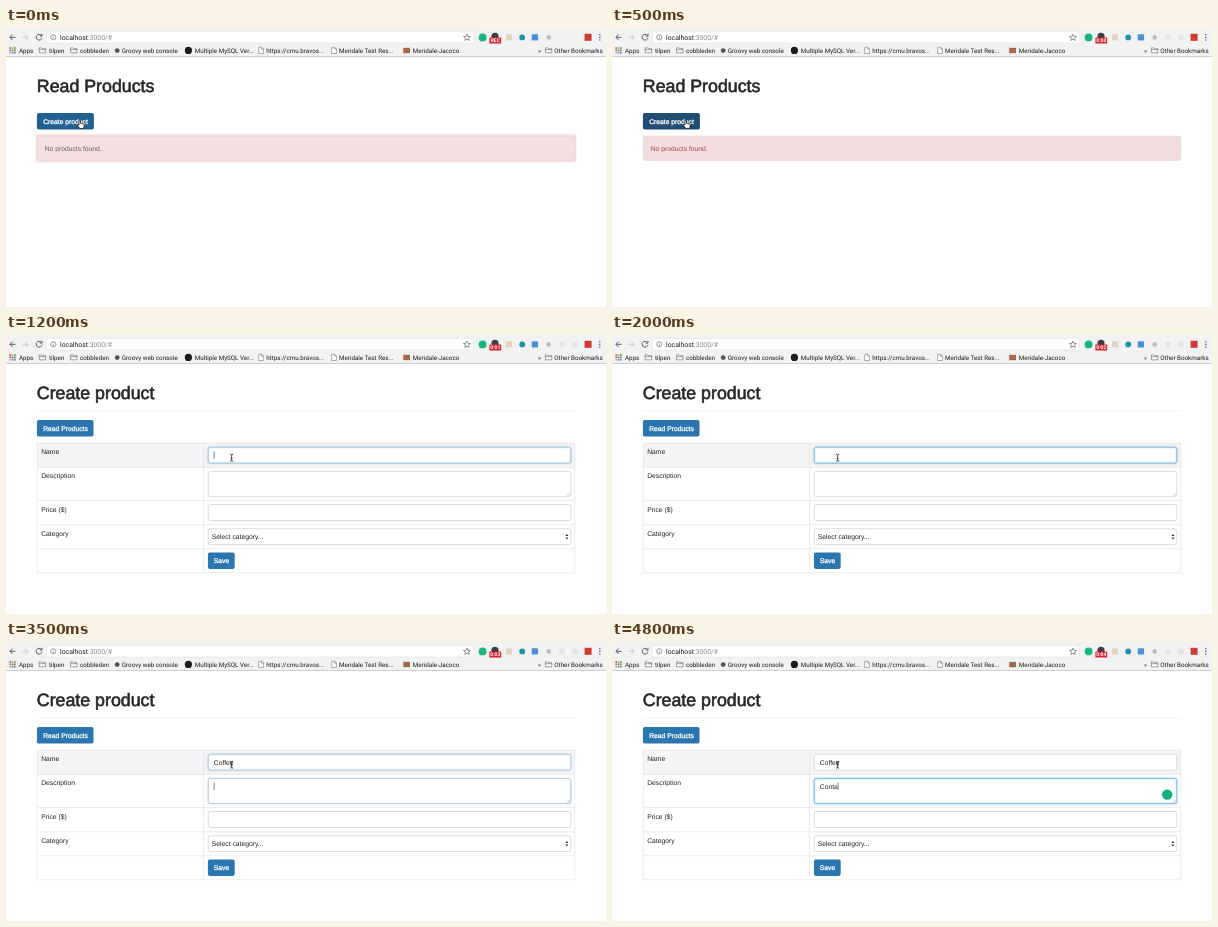
An HTML page that plays this animation: 600 by 279 pixels, repeating every 5 s.

```html
<!DOCTYPE html>
<html lang="en">
<head>
<meta charset="utf-8">
<title>Create product</title>
<style>
  html, body { margin: 0; width: 100%; height: 100%; overflow: hidden; background: #fff; }
  svg { display: block; width: 600px; height: 279px; }
  text { font: 6.75px "Liberation Sans", Arial, sans-serif; fill: #222; text-rendering: geometricPrecision; white-space: pre; }
  .bar text { font: 6.25px Roboto, sans-serif; fill: #1c1c1c; }
  .bar .url { font-size: 6.85px; }
  .title { font-size: 17.8px; fill: #262626; stroke: #262626; stroke-width: .6px; }
  .label { fill: #fff; stroke: #fff; stroke-width: .3px; }
  .button { fill: #2a76b1; }
  .line { fill: none; stroke: #e0e0e0; stroke-width: .6px; }
  .field { fill: #fff; stroke: #cdcdcd; stroke-width: .7px; }
  .halo { fill: none; stroke: #74bce6; }
</style>
</head>
<body>
<svg viewBox="0 0 600 279">
  <defs>
    <filter id="soft" x="-5%" y="-50%" width="110%" height="200%"><feGaussianBlur stdDeviation="1.2"/></filter>
    <path id="folder" d="M-3.2-2.5h2.3l.8.9h3.3v4.1h-6.4zM-3.2-.6h6.4" fill="#fafafa" stroke="#666" stroke-width=".6"/>
    <path id="sheet" d="M-2.3-3.1h3l1.7 1.7v4.5h-4.7zM.6-3.1v1.8h1.8" fill="#fff" stroke="#777" stroke-width=".6"/>
  </defs>
  <rect width="600" height="279" fill="#fff"/>

  <g class="bar">
    <rect width="600" height="28.5" fill="#f2f2f2"/>
    <rect x="40.5" y="3.5" width="427" height="11.5" rx="1.5" fill="#fff" stroke="#dedede" stroke-width=".5"/>
    <path d="M0 28.5H600" stroke="#c6c6c6" stroke-width=".8"/>
    <g fill="none" stroke-width=".95">
      <path d="M9.5 9.3H4M6.6 6.6L3.9 9.3l2.7 2.7" stroke="#555"/>
      <path d="M16.5 9.3H22M19.4 6.6l2.7 2.7-2.7 2.7" stroke="#c9c9c9"/>
      <path d="M35.2 7.3A2.9 2.9 0 1 0 35.9 9.8M36 5.8v2.3h-2.3" stroke="#555"/>
      <circle cx="47.3" cy="9.3" r="2.6" stroke="#777" stroke-width=".7"/>
      <path d="M47.3 8.9v2M47.3 7.5v.7" stroke="#777" stroke-width=".7"/>
      <path d="M461 6l1 2.3 2.5.2-1.9 1.6.6 2.4-2.2-1.3-2.2 1.3.6-2.4-1.9-1.6 2.5-.2z" stroke="#666" stroke-width=".7"/>
    </g>
    <text class="url" x="54" y="11.8">localhost<tspan fill="#888">:3000/#</tspan></text>
    <circle cx="476.6" cy="9.4" r="3.9" fill="#17b57f"/>
    <circle cx="489" cy="8.4" r="3.6" fill="#3d3d46"/>
    <rect x="483.4" y="9.6" width="11.8" height="5.9" rx=".6" fill="#d8232a"/>
    <text id="badge" x="489.3" y="14.4" text-anchor="middle" style="font-size:5px;font-weight:700;fill:#fff"></text>
    <rect x="500" y="6.4" width="6" height="6" fill="#e3d2bd"/>
    <circle cx="516.2" cy="9.4" r="2.9" fill="#1b93a8"/>
    <rect x="525.7" y="6.2" width="6.4" height="6.4" rx=".8" fill="#4b8fd8"/>
    <circle cx="542.7" cy="9.4" r="2.3" fill="#bdbdbd"/>
    <g id="faint" fill="#e4e4e4"><circle cx="556" cy="9.4" r="3"/><circle cx="569" cy="9.4" r="3"/></g>
    <rect x="578.6" y="5.8" width="7" height="7" fill="#cf3a34"/>
    <g fill="#666"><circle cx="593.8" cy="6.8" r=".8"/><circle cx="593.8" cy="9.4" r=".8"/><circle cx="593.8" cy="12" r=".8"/></g>

    <g id="apps"></g>
    <use href="#folder" x="36.4" y="22.3"/><use href="#folder" x="67.8" y="22.3"/><use href="#folder" x="542.6" y="22.3"/>
    <circle cx="111.2" cy="22.6" r="2.4" fill="#555"/>
    <circle cx="182.4" cy="22.4" r="3.6" fill="#1c1c1c"/>
    <use href="#sheet" x="255" y="22.4"/><use href="#sheet" x="328" y="22.4"/>
    <rect x="397.2" y="19.8" width="6.8" height="5.4" fill="#a5694b"/>
    <g id="marks"></g>
  </g>

  <g id="list">
    <text class="title" x="30.8" y="63.8">Read Products</text>
    <rect id="create" x="30.9" y="85.1" width="57" height="16.4" rx="1.8"/>
    <text class="label" x="37.2" y="95.8">Create product</text>
    <rect id="glow" x="31.5" y="108" width="537" height="24.5" fill="none" stroke="#f2d4d6" stroke-width="3" filter="url(#soft)"/>
    <rect id="alert" x="31.3" y="108.2" width="537.4" height="24.2" rx="2" stroke="#ebccd1" stroke-width=".6"/>
    <text id="empty" x="38.7" y="122.7">No products found.</text>
  </g>

  <g id="form">
    <text class="title" x="30.8" y="63.8">Create product</text>
    <path d="M31 76H569" stroke="#eee" stroke-width=".7"/>
    <rect class="button" x="30.9" y="85.1" width="56.6" height="16.4" rx="1.8"/>
    <text class="label" x="37.2" y="95.8">Read Products</text>
    <rect id="row" x="31.3" y="108.2" width="537.4" height="24.2" fill="#f5f4f6"/>
    <path class="line" d="M31.3 108.2H568.7V237.8H31.3ZM31.3 132.4H568.7M31.3 165.5H568.7M31.3 189.8H568.7M31.3 213.8H568.7M197.6 108.2V237.8"/>
    <g id="labels"></g>
    <g id="fields"></g>
    <path d="M561 160.6l2.8-2.8M562.6 160.6l1.2-1.2" stroke="#999" stroke-width=".5"/>
    <text x="205.8" y="204.2">Select category...</text>
    <path d="M559.4 201.1l1.5-2 1.5 2zM559.4 202.4l1.5 2 1.5-2z" fill="#333"/>
    <rect class="button" x="201.9" y="217.6" width="26.8" height="16.3" rx="1.8"/>
    <text class="label" x="207.8" y="228.2">Save</text>
    <text id="name" x="207.8" y="122.7"></text>
    <text id="desc" x="207.8" y="146.6"></text>
    <path id="caret" d="M0 0V7.6" stroke="#333" stroke-width=".6"/>
    <circle id="helper" cx="555.2" cy="152.6" r="5.2" fill="#12b184"/>
  </g>

  <g id="hand"><path d="M-1.2-3.6q.9-.9 1.5 0V-.9l3 .7q.8.3.7 1.2L3.4 4.3H-.2L-2.9 1q-.2-1.1.8-.8l.9.8z" fill="#fff" stroke="#111" stroke-width=".7"/></g>
  <g id="arrow"><path d="M0 0v7.6l1.8-1.6 1.2 2.8 1.2-.5-1.2-2.7h2.4z" fill="#111" stroke="#fff" stroke-width=".5"/></g>
  <g id="beam"><path d="M-1.6-3.4Q0-3.4 0-2.4Q0-3.4 1.6-3.4M0-2.4V2.6M-1.6 3.6Q0 3.6 0 2.6Q0 3.6 1.6 3.6M-.9.9H.9" fill="none" stroke="#222" stroke-width=".75"/></g>
</svg>
<script>
const LOOP = 5000, STEP = 100;
const FORM_AT = 600, FOCUS_NAME = 1100, FOCUS_DESC = 3430, FADE = 150;
const $ = id => document.getElementById(id);

function add(parent, tag, attrs, text = '') {
  const el = document.createElementNS('http://www.w3.org/2000/svg', tag);
  for (const key in attrs) el.setAttribute(key, attrs[key]);
  el.textContent = text;
  return parent.appendChild(el);
}

// Static parts
const tints = ['#d9534f', '#e5a93d', '#4aa564', '#4a8fd6', '#d9534f', '#4aa564', '#e5a93d', '#4a8fd6', '#8a6bb8'];
tints.forEach((fill, i) => add($('apps'), 'rect', {
  x: 3.4 + i % 3 * 2.3, y: 19.2 + Math.floor(i / 3) * 2.3, width: 1.7, height: 1.7, fill
}));

[[13, 'Apps'], [43, 'tilpen'], [74, 'cobbleden'], [115.8, 'Groovy web console'],
 [188.8, 'Multiple MySQL Ver...'], [260.2, 'https://cmu.bravos...'], [333, 'Meridale Test Res...'],
 [406.8, 'Meridale-Jacoco'], [532, '»'], [548.3, 'Other Bookmarks']]
  .forEach(([x, label]) => add($('marks'), 'text', { x, y: 24.7 }, label));

[['Name', 119.3], ['Description', 143.3], ['Price ($)', 176.5], ['Category', 200.5]]
  .forEach(([label, y]) => add($('labels'), 'text', { x: 35.2, y }, label));

const halos = [[112.2, 16], [136.4, 25.2], [169.5, 16], [193.8, 15.8]].map(([y, height]) => {
  const box = { x: 202.2, y, width: 362.6, height, rx: 2 };
  add($('fields'), 'rect', { ...box, class: 'field' });
  const halo = add($('fields'), 'g', { class: 'halo' });
  add(halo, 'rect', { ...box, 'stroke-width': 1.6, 'stroke-opacity': .4, filter: 'url(#soft)' });
  add(halo, 'rect', { ...box, 'stroke-width': .8 });
  return halo;
});

// Time of each visible key press and the text it leaves
const nameKeys = [[2700, 'C'], [2800, 'Co'], [3000, 'Coff'], [3100, 'Coffe'], [3200, 'Coffee']];
const descKeys = [[4000, 'C'], [4200, 'Co'], [4400, 'Con'], [4600, 'Cont'], [4800, 'Conta']];
const badges = [[0, 'REC'], [100, '0:00'], [1100, '0:01'], [2000, '0:02'], [3100, '0:03'], [4100, '0:04']];

const latest = (steps, t, start) => steps.reduce((last, s) => s[0] <= t ? s : last, start);
const ramp = (t, from, length) => Math.min(1, Math.max(0, (t - from) / length));
const show = (el, on) => el.setAttribute('visibility', on ? 'visible' : 'hidden');
const place = (el, x, y) => el.setAttribute('transform', `translate(${x} ${y})`);

function drawPointer(t) {
  const p = ramp(t, 600, 400), ease = p * p * (3 - 2 * p);
  const x = 74.2 + 151.4 * ease, y = 96.2 + 26.4 * ease;
  const kind = x < 87 ? 'hand' : x > 202 ? 'beam' : 'arrow';
  for (const id of ['hand', 'arrow', 'beam']) {
    show($(id), id === kind);
    place($(id), x, y);
  }
  $('row').setAttribute('opacity', y > 108 ? 1 : 0);
}

function drawList(t) {
  const first = t < 100;
  show($('glow'), first);
  $('create').setAttribute('fill', first ? '#22608f' : '#204d74');
  $('alert').setAttribute('fill', first ? '#f4e0e0' : '#f2dede');
  $('empty').style.fill = first ? '#75595b' : '#a94442';
}

function drawForm(t) {
  const inDesc = t >= FOCUS_DESC;
  const name = latest(nameKeys, t, [FOCUS_NAME, '']);
  const desc = latest(descKeys, t, [FOCUS_DESC, '']);
  $('name').textContent = name[1];
  $('desc').textContent = desc[1];

  const left = ramp(t, FOCUS_DESC, FADE);
  halos.forEach((halo, i) => halo.setAttribute('opacity',
    i === 0 ? ramp(t, FOCUS_NAME, FADE) * (1 - left) : i === 1 ? left : 0));

  const active = inDesc ? desc : name;
  const width = active[1] ? $(inDesc ? 'desc' : 'name').getComputedTextLength() : 0;
  place($('caret'), 208.2 + width, inDesc ? 140.4 : 116.4);
  $('caret').setAttribute('opacity', t >= FOCUS_NAME && (t - active[0]) % 1000 < 500 ? 1 : 0);
  $('helper').setAttribute('opacity', t >= 4000 ? 1 : 0);
}

function render(now) {
  const t = Math.floor(now % LOOP / STEP) * STEP;
  const onForm = t >= FORM_AT;
  $('list').style.display = onForm ? 'none' : '';
  $('form').style.display = onForm ? '' : 'none';
  $('badge').textContent = latest(badges, t)[1];
  show($('faint'), t >= 100);
  if (onForm) drawForm(t); else drawList(t);
  drawPointer(t);
}

const start = performance.now();
function tick() {
  render(performance.now() - start);
  requestAnimationFrame(tick);
}
tick();
</script>
</body>
</html>
```
